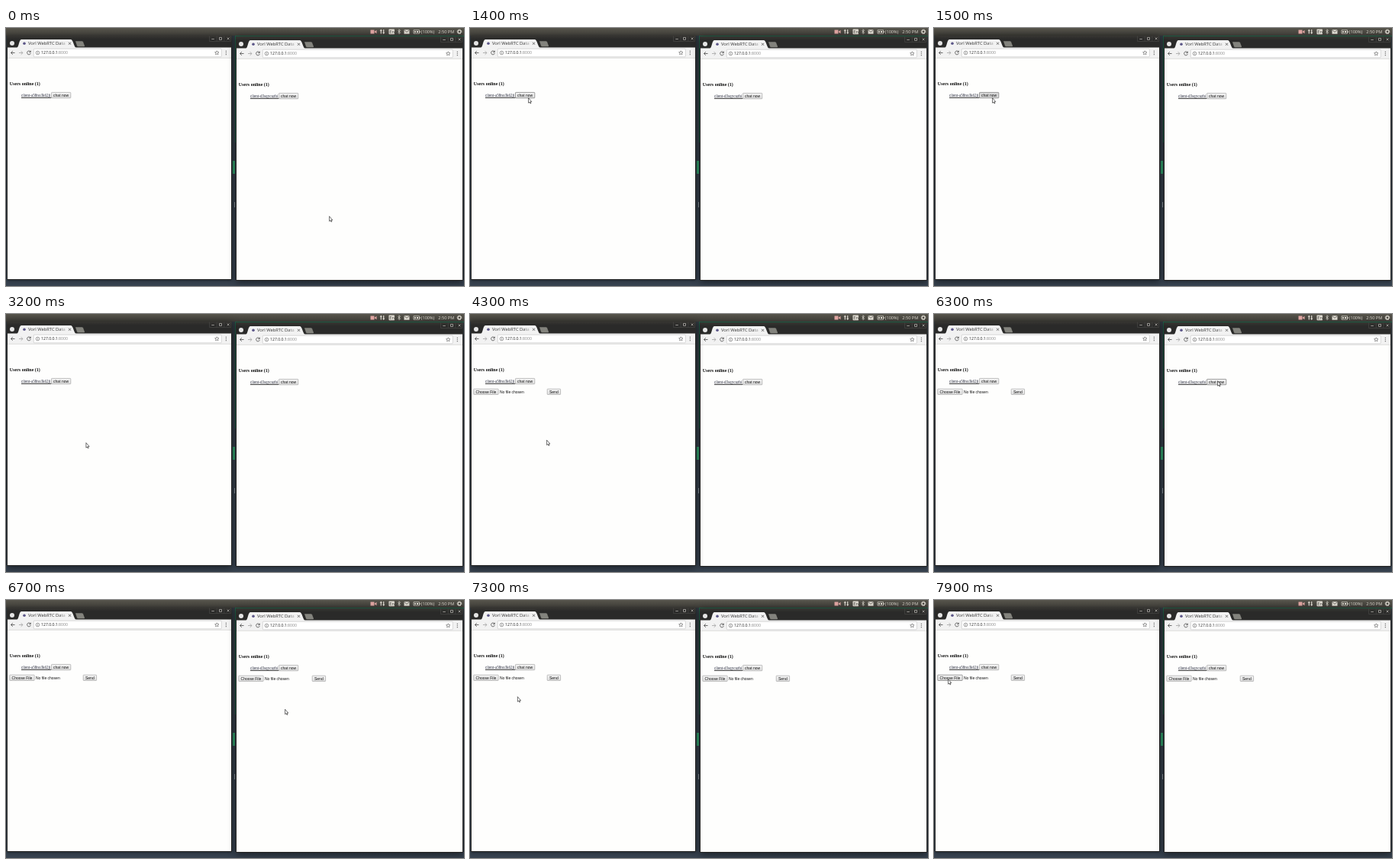
An HTML page that plays this animation: 600x338 px, repeating every 8000 ms.

```html
<!DOCTYPE html>
<html lang="en">
<head>
<meta charset="utf-8">
<title>Peer chat in two browser windows</title>
<style>
html, body { margin: 0; width: 100%; height: 100%; overflow: hidden; background: #333c48; }
svg { display: block; width: 600px; height: 338px; }
.ui { font-family: "Open Sans", "Noto Sans", sans-serif; }
.page { font-family: "Liberation Serif", serif; }
.form { font: 5px "Liberation Sans", sans-serif; }
.line { fill: none; stroke: #5a5a5a; stroke-width: .9; }
.thin { stroke-width: .6; }
.pale { stroke: #aaa; }
.frame { filter: drop-shadow(0 1px 2px rgba(0,0,0,.4)); }
.active .frame { filter: drop-shadow(0 2px 5px rgba(0,0,0,.55)); }
.button rect { fill: url(#face); stroke: #a9a9a9; stroke-width: .7; }
.button.hover rect { stroke: #777; }
.button.pressed rect { fill: #d8d8d8; }
</style>
</head>
<body>
<svg id="stage" viewBox="0 0 600 338">
  <defs>
    <linearGradient id="panel" x2="0" y2="1"><stop stop-color="#57554c"/><stop offset="1" stop-color="#3d3c37"/></linearGradient>
    <linearGradient id="desk" x2="0" y2="1"><stop stop-color="#30383f"/><stop offset="1" stop-color="#37424f"/></linearGradient>
    <linearGradient id="bar" x2="0" y2="1"><stop stop-color="#373632"/><stop offset=".3" stop-color="#2a2a29"/></linearGradient>
    <linearGradient id="face" x2="0" y2="1"><stop stop-color="#f5f5f5"/><stop offset="1" stop-color="#dedede"/></linearGradient>
    <linearGradient id="fade"><stop stop-color="#f2f2f2" stop-opacity="0"/><stop offset="1" stop-color="#f2f2f2"/></linearGradient>
  </defs>

  <rect width="600" height="338" fill="url(#desk)"/>
  <path fill="#1f6349" d="M300 10h300v1h-299v139h-1z"/>
  <path fill="#2f9a68" d="M297 174h3v17h-3z"/>
  <path fill="#8b949b" d="M299 228h1v7h-1z"/>

  <g class="ui" font-size="5.6" fill="#dfdbd2">
    <rect width="600" height="10" fill="url(#panel)"/>
    <path fill="#e0a5a2" d="M477.500 2.500h5v5h-5zM483 4.500l2.500-1.700v4.500l-2.500-1.700z"/>
    <path d="M491.300 1.500l1.700 2.300h-1.100v3.700h-1.200v-3.700h-1.100zM494.700 8l-1.700-2.300h1.100v-3.700h1.200v3.700h1.100z"/>
    <rect x="501.500" y="1.500" width="7.500" height="6.800" rx=".8"/>
    <text x="502.300" y="6.900" fill="#3d3c37">En</text>
    <path d="M513.500 3l3 3.200-1.500 1.500v-6l1.500 1.500-3 3.200" fill="none" stroke="#dfdbd2" stroke-width=".7"/>
    <path d="M521.500 2.200h7v5.500h-7z"/>
    <path d="M521.500 2.500l3.500 2.800 3.500-2.800" fill="none" stroke="#45433d" stroke-width=".7"/>
    <path d="M534 2.700h7.500v4.500h-7.500z" fill="none" stroke="#dfdbd2" stroke-width=".7"/>
    <path d="M535.200 3.900h1.700v2.100h-1.700zM538 3.900h2.200v2.100h-2.200zM541.900 4h.8v1.900h-.8z"/>
    <text x="543.800" y="6.900">(100%)</text>
    <text x="566.300" y="6.900">2:50 PM</text>
    <circle cx="594" cy="4.800" r="2" fill="none" stroke="#dfdbd2" stroke-width="1.200"/>
    <circle cx="594" cy="4.800" r="2.900" fill="none" stroke="#dfdbd2" stroke-dasharray="1.140"/>
  </g>

  <path id="cursor" d="M.6.700V7.200L2 6L3 8L3.900 7.600L3 5.600H4.800Z" fill="#fff" stroke="#222" stroke-width=".65"/>
</svg>
<script>
const stage = document.getElementById('stage');
const cursor = document.getElementById('cursor');
const LOOP = 8000, STEP = 100;

const button = (name, x, y, w, label, textX) => `
  <g class="button ${name}"><rect x="${x}" y="${y}" width="${w}" height="7.300" rx=".6"/>
  <text x="${textX}" y="${y + 5.3}" fill="#111">${label}</text></g>`;

function makeWindow(x, y, w, client, chatX) {
  const g = document.createElementNS('http://www.w3.org/2000/svg', 'g');
  g.setAttribute('transform', `translate(${x} ${y})`);
  g.innerHTML = `
    <rect class="frame" x="1" y="10" width="${w}" height="320" rx="1" fill="#252524"/>
    <rect x="1" y="10" width="${w}" height="16" rx="1" fill="url(#bar)"/>
    <rect x="2" y="25.500" width="${w - 2}" height="14" fill="#f2f2f2"/>
    <rect x="2" y="39" width="${w - 2}" height="290" fill="#fefefd"/>
    <path d="M2 39.300h${w - 2}" stroke="#c4c4c4" stroke-width=".6"/>
    <circle cx="8" cy="20" r="3" fill="#e4e4e4"/>
    <path d="M14 26C17 25.500 17 15 20 15H85C88 15 89 25.500 92 26Z" fill="#f2f2f2"/>
    <path d="M91 17.200h8.500q1 0 1.500 1l2 5q.3 1-.8 1h-7.700q-1 0-1.500-1z" fill="#83837d"/>
    <circle cx="24" cy="20.300" r="1.800" fill="#5c5788"/>
    <g class="ui">
      <text x="29" y="22.300" font-size="5.800" fill="#333">Vorl WebRTC Data</text>
      <rect x="70" y="16" width="11" height="9" fill="url(#fade)"/>
      <rect x="36.300" y="27.200" width="${w - 49}" height="10.600" rx="1" fill="#fff" stroke="#c2c2c2" stroke-width=".6"/>
      <text x="46" y="34.400" font-size="5.150" fill="#222">127.0.0.1<tspan fill="#888">:8000</tspan></text>
    </g>
    <path class="line" d="M82 18.800l3 3m0-3l-3 3M11.500 32.500h-5m2.300-2.300l-2.300 2.300 2.300 2.300"/>
    <path class="line pale" d="M17 32.500h5m-2.300-2.300l2.300 2.300-2.300 2.300"/>
    <path class="line" d="M32 31a2.400 2.400 0 1 0 .3 2.200M32.300 29.700v2h-2"/>
    <circle class="line thin" cx="41.500" cy="32.500" r="2.300"/>
    <path class="line thin" d="M41.500 32v1.700M41.500 30.900v.6"/>
    <path class="line thin" transform="translate(${w - 18.7} 32.500)"
      d="M0-2.700l.8 1.800 1.900.1-1.500 1.300.5 1.900L0 1.400l-1.700 1 .5-1.900-1.500-1.300 1.900-.1z"/>
    <path transform="translate(${w - 6.7} 32.500)" fill="#555" d="M-.5-2.700h1v1.200h-1zM-.5-.6h1v1.200h-1zM-.5 1.500h1v1.200h-1z"/>
    <g transform="translate(${w} 14)" fill="none" stroke-width=".65">
      <path d="M-28.500-3.500v7h28v-7M-18.800-3.500v7M-9.200-3.500v7" stroke="#4a4a47"/>
      <path d="M-25.700.5h3.500M-15.500-1.600h3v3h-3zM-5.300-1.500l2.800 2.800m0-2.800l-2.800 2.800" stroke="#cfcdc7"/>
    </g>
    <g class="page">
      <text x="4.800" y="74.600" font-size="6" font-weight="bold" fill="#111">Users online (1)</text>
      <text x="20" y="89.700" font-size="5.100" fill="#2b2e40">${client}</text>
      <path d="M20 91.300H${chatX}" stroke="#111" stroke-width=".9"/>
    </g>
    <g class="form">
      ${button('chat', chatX, 84.4, 25.3, 'chat now', chatX + 2.6)}
      <g class="files">
        ${button('choose', 4.8, 98.2, 32.4, 'Choose File', 7.6)}
        <text x="39" y="103.500" fill="#111">No file chosen</text>
        ${button('send', 101.2, 98.2, 17.4, 'Send', 104)}
      </g>
    </g>`;
  stage.insertBefore(g, cursor);
  return g;
}

const left = makeWindow(0, 0, 295, 'client-a58no3k62ji', 59.5);
const right = makeWindow(300, 1, 298, 'client-d3sqycuzhi', 57.5);

// Pointer path: time, x, y
const path = [
  [0, 423, 246], [100, 423, 246], [400, 135, 131], [800, 135, 131],
  [1300, 76, 91], [2100, 76, 91], [2200, 104.3, 168], [3100, 104.3, 168],
  [3200, 104.3, 168], [3600, 100, 164.5], [5000, 100, 164.5], [5300, 240, 179],
  [5500, 350, 156], [5900, 394, 77], [6000, 394, 77], [6300, 371, 87],
  [6500, 371, 87], [6700, 365, 142.5], [7000, 235, 150], [7400, 4, 118],
  [7700, 17, 102], [7800, 17, 102], [7900, 18, 103], [8000, 18, 103]
];

function pointAt(t) {
  const i = path.findIndex(p => p[0] > t);
  const [t0, x0, y0] = path[i - 1], [t1, x1, y1] = path[i];
  const k = (t - t0) / (t1 - t0);
  return [x0 + (x1 - x0) * k, y0 + (y1 - y0) * k];
}

const toggle = (win, part, name, on) => win.querySelector(part).classList.toggle(name, on);
const showFiles = (win, on) => win.querySelector('.files').setAttribute('visibility', on ? 'visible' : 'hidden');
let front = right;

function draw(now) {
  const t = Math.floor(now % LOOP / STEP) * STEP;
  const between = (a, b) => t >= a && t < b;

  const focused = between(1500, 6600) ? left : right;
  if (focused !== front) stage.insertBefore(front = focused, cursor);
  left.classList.toggle('active', focused === left);
  right.classList.toggle('active', focused === right);

  showFiles(left, t >= 4300);
  showFiles(right, t >= 6600);
  toggle(left, '.chat', 'hover', between(1300, 2200));
  toggle(left, '.chat', 'pressed', between(1500, 1700));
  toggle(right, '.chat', 'hover', between(6200, 6600));
  toggle(left, '.choose', 'hover', t >= 7600);

  cursor.setAttribute('transform', `translate(${pointAt(t)})`);
  requestAnimationFrame(draw);
}
draw(performance.now());
</script>
</body>
</html>
```
